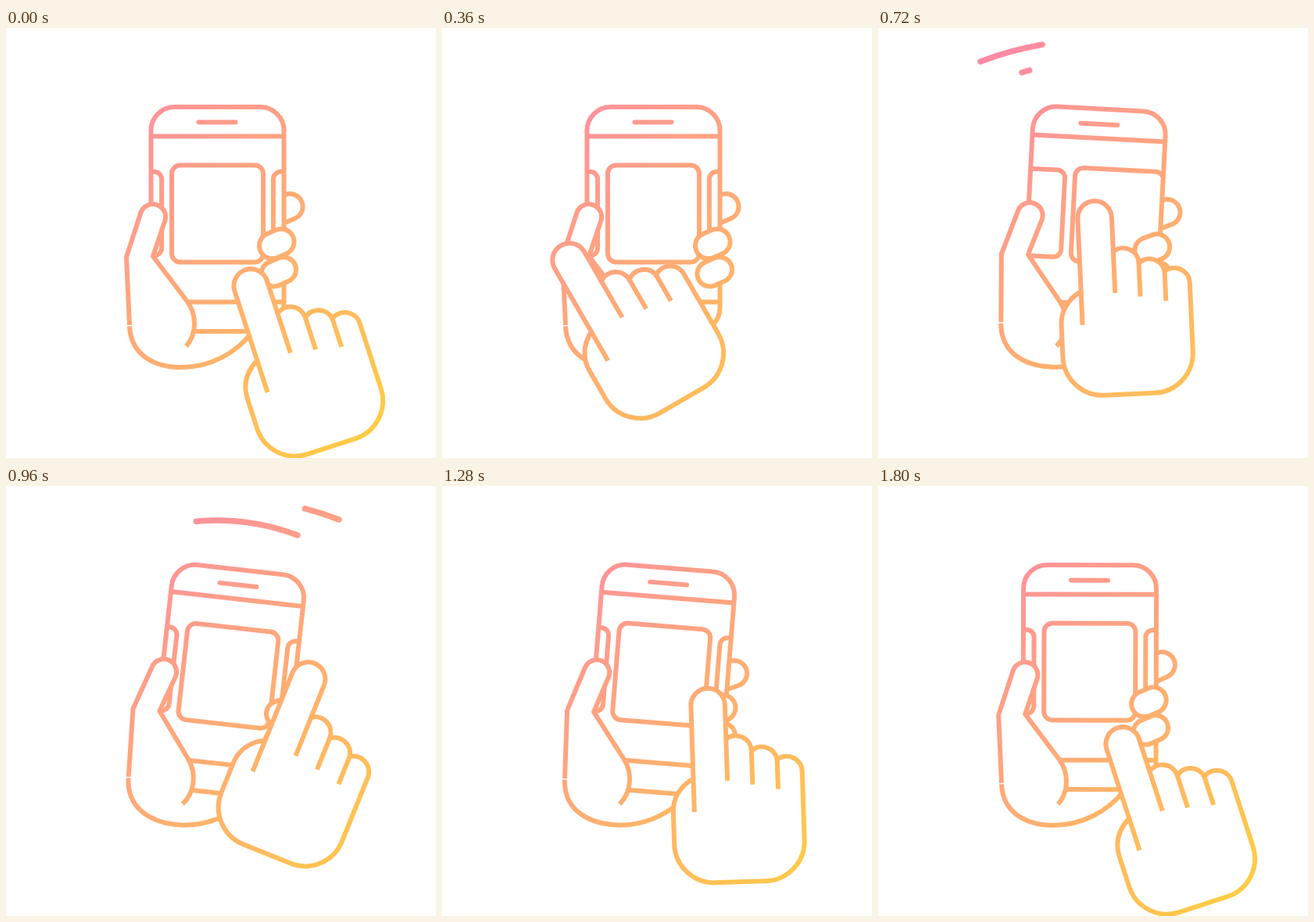
Recreate the animation shown at these times as an HTML page with a canvas. Size 550 by 550 pixels, loop 1.84 s.

```html
<!DOCTYPE html>
<html>
<head>
<meta charset="utf-8">
<style>
html, body { margin: 0; width: 100%; height: 100%; overflow: hidden; background: #fff; }
canvas { display: block; }
</style>
</head>
<body>
<canvas id="stage" width="550" height="550"></canvas>
<script>
const ctx = document.getElementById('stage').getContext('2d');
const LOOP = 1840;

const tint = ctx.createLinearGradient(86, 86, 512, 512);
tint.addColorStop(0, '#ff89a9');
tint.addColorStop(1, '#ffcf40');

const phone = new Path2D();
phone.roundRect(185.5, 101, 170, 287, 30);
const phoneLines = new Path2D('M185.5 138.5H355.5M185.5 350.5H355.5');
const speaker = new Path2D('M246.5 120.5H293.5');
const palm = new Path2D('M158 381.5C160 420 192 434 224 434C262 434 295 415 314 390');
const thumb = new Path2D('M158 380L154 293L172.5 236A16.3 16.3 0 0 1 203.5 246L188 292L232 350C243.5 366 245 390 230.5 407');
// Pointing hand, upright; its origin is the base of the index finger.
const hand = new Path2D('M0 -43V-136A21.75 21.75 0 0 1 43.5 -136V-92A20 20 0 0 1 75.5 -76A20 20 0 0 1 108 -64' +
  'A20 20 0 0 1 139.5 -47V40A51 51 0 0 1 88 91H24A51 51 0 0 1 -27 40V0Q-27 -28 0 -43Z');
const creases = new Path2D('M0 0V-44M43.5 -92V-39M75.5 -76V-33M108 -64V-26');
const outerArc = new Path2D('M131 43A409 409 0 0 1 426 43');
const innerArc = new Path2D('M184 57A290 290 0 0 1 373 63');

const clamp = (t, a, b) => Math.min(1, Math.max(0, (t - a) / (b - a)));
function ease(t, a, b) {
  const u = clamp(t, a, b);
  return u * u * (3 - 2 * u);
}

function line(path, width = 6, cap = 'butt') {
  ctx.lineWidth = width;
  ctx.lineCap = cap;
  ctx.stroke(path);
}

function shape(path) {
  ctx.fill(path);
  line(path);
}

function pill(x1, y1, x2, y2, r) {
  const path = new Path2D();
  const a = Math.atan2(y2 - y1, x2 - x1), q = Math.PI / 2;
  path.arc(x1, y1, r, a + q, a - q);
  path.arc(x2, y2, r, a - q, a + q);
  path.closePath();
  shape(path);
}

function cards(shift) {
  ctx.save();
  ctx.clip(phone);
  for (let i = -2; i < 2; i++) {
    const pos = i + shift;
    const s = 1 - 0.135 * Math.min(1, Math.abs(pos));
    const path = new Path2D();
    path.roundRect(270.5 + 122 * pos - 58.5 * s, 237.5 - 62 * s, 117 * s, 124 * s, 11 * s);
    line(path);
  }
  ctx.restore();
}

function holder(t) {
  const tilt = 6.4 * ease(t, 500, 960) - 6.2 * ease(t, 1010, 1780) - 0.2 * ease(t, 1780, LOOP);
  ctx.save();
  ctx.translate(230, 365);
  ctx.rotate(tilt * Math.PI / 180);
  ctx.translate(-230, -365);
  pill(350.5, 234, 363, 228.5, 16.5);
  line(palm);
  ctx.fill(phone);
  cards(ease(t, 615, 950));
  line(phone);
  line(phoneLines);
  line(speaker, 6, 'round');
  pill(340.5, 278.5, 352, 273.5, 16.5);
  pill(342.5, 314.5, 355, 309, 16);
  shape(thumb);
  ctx.restore();
}

function pointer(t) {
  const reach = ease(t, 0, 450), swipe = ease(t, 450, 965);
  const back = 1 - (1 - clamp(t, 965, 1720)) ** 2;
  const x = 334.5 - 136 * reach + 117 * swipe + 19 * back ** 2.3;
  const y = 466 - 45 * reach - 56 * swipe - 11 * Math.sin(Math.PI * swipe) + 101 * back ** 1.6;
  const angle = -18 - 13.4 * reach + 53.4 * swipe - 40 * back ** 1.25;
  ctx.save();
  ctx.translate(x, y);
  ctx.rotate(angle * Math.PI / 180);
  shape(hand);
  line(creases);
  ctx.restore();
}

function streak(path, length, from, to) {
  if (to <= from) return;
  ctx.setLineDash([(to - from) * length, 999]);
  ctx.lineDashOffset = -from * length;
  line(path, 7.5, 'round');
  ctx.setLineDash([]);
}

function draw(now) {
  const t = now % LOOP;
  ctx.globalCompositeOperation = 'source-over';
  ctx.fillStyle = '#fff';
  ctx.strokeStyle = '#000';
  ctx.lineJoin = 'round';
  ctx.fillRect(0, 0, 550, 550);
  holder(t);
  pointer(t);
  streak(outerArc, 302, ease(t, 720, 1040), ease(t, 625, 905));
  streak(innerArc, 192.5, ease(t, 849, 1149), ease(t, 682, 962));
  // Screening turns every black line into the fixed gradient.
  ctx.globalCompositeOperation = 'screen';
  ctx.fillStyle = tint;
  ctx.fillRect(0, 0, 550, 550);
}

const start = performance.now();
function tick() {
  draw(performance.now() - start);
  requestAnimationFrame(tick);
}
tick();
</script>
</body>
</html>
```
